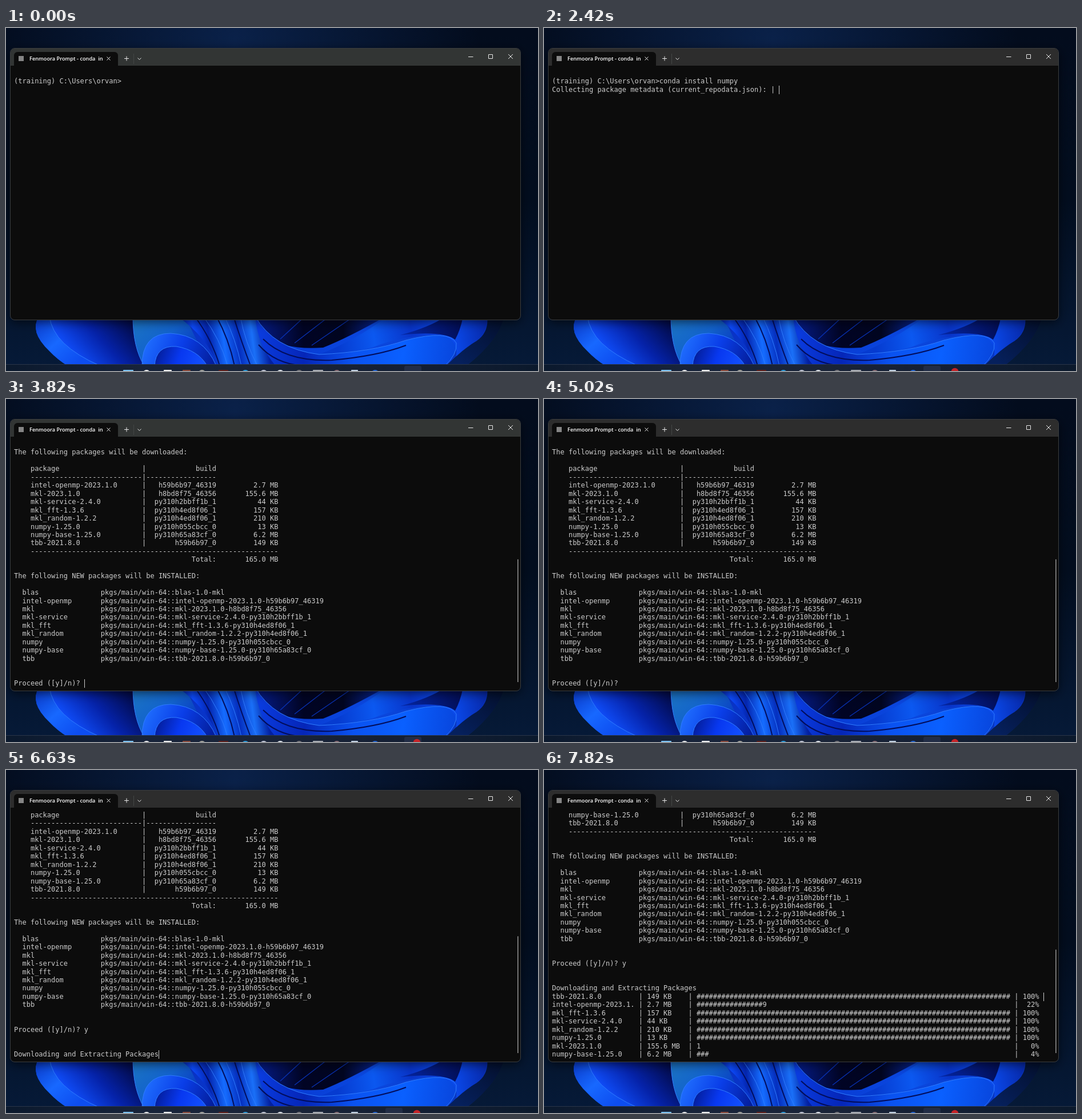
An HTML page with a canvas that plays this animation: 931x601 px, repeating every 8 s.

```html
<!DOCTYPE html>
<html lang="en">
<head>
<meta charset="utf-8">
<title>Terminal</title>
<style>
  html, body { margin: 0; width: 100%; height: 100%; overflow: hidden; background: #030d1e; }
  canvas { display: block; }
</style>
</head>
<body>
<canvas id="stage" width="931" height="601"></canvas>
<script>
const W = 931, H = 601, LOOP = 8000;
const CELL = 7.225, ROW = 14.45, LEFT = 14, TOP = 71.7, ROWS = 30;
const ctx = document.getElementById('stage').getContext('2d');

// name, version, build, size
const packages = [
  ['intel-openmp', '2023.1.0', 'h59b6b97_46319', '2.7 MB'],
  ['mkl', '2023.1.0', 'h8bd8f75_46356', '155.6 MB'],
  ['mkl-service', '2.4.0', 'py310h2bbff1b_1', '44 KB'],
  ['mkl_fft', '1.3.6', 'py310h4ed8f06_1', '157 KB'],
  ['mkl_random', '1.2.2', 'py310h4ed8f06_1', '210 KB'],
  ['numpy', '1.25.0', 'py310h055cbcc_0', '13 KB'],
  ['numpy-base', '1.25.0', 'py310h65a83cf_0', '6.2 MB'],
  ['tbb', '2021.8.0', 'h59b6b97_0', '149 KB']
];

// package index, progress at the first full report, gain per report (tenths of a bar cell)
const downloads = [
  [7, 81, 340], [0, 13, 39], [3, 231, 270], [2, 760, 760],
  [4, 115, 330], [5, 0, 380], [1, 0, 0.25], [6, 0, 7.5]
];

const tableRow = (a, b, c) => '    ' + a.padEnd(27) + '|' + b.padStart(17) + c.padStart(15);

const summary = [
  '',
  'The following packages will be downloaded:',
  '',
  tableRow('package', 'build', ''),
  '    ' + '-'.repeat(27) + '|' + '-'.repeat(17),
  ...packages.map(([n, v, b, s]) => tableRow(n + '-' + v, b, s)),
  '    ' + '-'.repeat(60),
  'Total:'.padStart(49) + '165.0 MB'.padStart(15),
  '',
  'The following NEW packages will be INSTALLED:',
  '',
  '  ' + 'blas'.padEnd(19) + 'pkgs/main/win-64::blas-1.0-mkl',
  ...packages.map(([n, v, b]) => '  ' + n.padEnd(19) + `pkgs/main/win-64::${n}-${v}-${b}`),
  '',
  ''
];

function downloadRow([index, start, gain], step) {
  const [name, version, , size] = packages[index];
  const done = Math.max(0, Math.min(760, Math.floor(start + gain * step)));
  const bar = '#'.repeat(Math.floor(done / 10)) + (done % 10 || '');
  const percent = Math.round(done / 7.6) + '%';
  return `${name}-${version}`.slice(0, 20).padEnd(21) + '| ' + size.padEnd(10) +
    '| ' + bar.padEnd(76) + ' | ' + percent.padStart(4) + ' ';
}

const stepsSince = (t, start) => Math.floor((t - start + 10) / 200);

function terminalLines(t) {
  if (t < 3820) {
    const command = 'conda install numpy';
    const typed = t < 410 ? 0 : t < 610 ? 9 : command.length;
    const lines = ['', '(training) C:\\Users\\orvan>' + command.slice(0, typed)];
    if (t >= 1830) {
      const spin = '-\\|/'[(stepsSince(t, 2420) + 2) % 4];
      const collecting = 'Collecting package metadata (current_repodata.json): ';
      if (t < 2420) lines.push('');
      else if (t < 3620) lines.push(collecting + spin + ' ');
      else lines.push(collecting + 'done', 'Solving environment: ' + spin + ' ');
    }
    return lines;
  }
  const lines = [...summary, 'Proceed ([y]/n)? ' + (t >= 5410 ? 'y' : '')];
  if (t >= 6630) lines.push('', '', 'Downloading and Extracting Packages');
  if (t >= 6830) {
    const step = stepsSince(t, 7030);
    lines.push(...downloads.map(d => downloadRow(d, step)));
  }
  return lines;
}

const within = (t, a, b) => t >= a && t < b;

function caretVisible(t) {
  return t >= 200 && !within(t, 1210, 1610) && !within(t, 4820, 5210) && !within(t, 6010, 6630);
}

function drawTerminal(t) {
  const lines = terminalLines(t);
  const first = Math.max(0, lines.length - ROWS);
  ctx.font = '12px "DejaVu Sans Mono", monospace';
  ctx.fillStyle = '#cccccc';
  lines.slice(first).forEach((line, r) => {
    for (let c = 0; c < line.length; c++) {
      if (line[c] !== ' ') ctx.fillText(line[c], LEFT + c * CELL, TOP + r * ROW + 11 + 14.45 * 0 + 0.3);
    }
  });
  if (caretVisible(t)) {
    const row = t >= 6830 ? lines.length - downloads.length : lines.length - 1;
    const x = Math.round(LEFT + lines[row].length * CELL - 0.4 + (row === 1 ? -1 : 0) * 0 + 0.3);
    ctx.fillRect(x, Math.round(TOP + (row - first) * ROW), 1, 15);
  }
  if (t >= 3820) {
    const thumb = 423 * ROWS / (lines.length + 29);
    ctx.fillStyle = '#8c8c8c';
    ctx.fillRect(895, 496 - thumb, 1.6, thumb);
  }
}

function box(g, x, y, w, h, r, color) {
  g.fillStyle = color;
  g.beginPath();
  g.roundRect(x, y, w, h, r);
  g.fill();
}

function disc(g, x, y, r, color) {
  g.fillStyle = color;
  g.beginPath();
  g.arc(x, y, r, 0, 7);
  g.fill();
}

function gradient(g, line, colors) {
  const fill = g.createLinearGradient(...line);
  colors.forEach((c, i) => fill.addColorStop(i / (colors.length - 1), c));
  return fill;
}

function petal(g, path, line, ...colors) {
  g.fillStyle = gradient(g, line, colors);
  g.fill(new Path2D(path));
}

function strokes(g, color, width, ...paths) {
  g.strokeStyle = color;
  g.lineWidth = width;
  paths.forEach(p => g.stroke(new Path2D(p)));
}

function drawBloom(g) {
  petal(g, 'M830 505H872Q862 548 806 592H740Z', [800, 590, 870, 510], '#06205c', '#030f2c');
  petal(g, 'M58 505Q40 532 76 566Q90 581 108 592H770Q800 562 828 545Q845 530 842 505Z',
    [51, 0, 842, 0], '#0d4df0', '#0a30c0', '#0838d0', '#0a48e0', '#0730b8');
  petal(g, 'M58 505Q40 532 76 566Q90 581 108 592H165Q82 556 76 505Z',
    [55, 515, 120, 590], '#0a3fd0', '#1768ff', '#0d4df0');
  petal(g, 'M76 505Q82 556 165 592H242Q222 560 222 505Z',
    [212, 508, 125, 588], '#020a48', '#0522a8', '#1050ff');
  petal(g, 'M222 505H312Q336 545 350 592H242Q222 560 222 505Z',
    [230, 512, 310, 592], '#1a72c4', '#1262cc', '#0633c0');
  petal(g, 'M238 592Q238 535 288 535Q345 538 368 592Z',
    [245, 540, 360, 592], '#2070ff', '#0a3ee8', '#041e9c');
  petal(g, 'M260 592Q262 556 298 558Q336 564 352 592Z',
    [262, 560, 345, 592], '#031a90', '#0838f0', '#1250ff');
  petal(g, 'M300 505H440Q442 560 480 592H372Q350 540 300 505Z',
    [305, 550, 455, 530], '#04189a', '#0d4cff', '#0426b0', '#156cff', '#0530c0', '#1a70f8', '#0320a0');
  petal(g, 'M432 505H665Q600 542 555 560Q490 565 455 540Z',
    [450, 0, 660, 0], '#04187c', '#010424', '#010520', '#0626a0');
  petal(g, 'M436 505Q468 562 548 572Q640 568 700 547Q775 528 788 552Q790 572 768 592H472Q440 555 436 505Z',
    [440, 540, 780, 580], '#0a3ce0', '#0526b8', '#0a52f0', '#0a60ff', '#0848e0');
  petal(g, 'M548 572Q610 548 668 505H842Q844 530 824 548Q806 558 788 575Q792 542 755 537Q690 540 640 560Q590 574 548 572Z',
    [580, 560, 840, 515], '#063bd0', '#0b58f0', '#0834c8', '#0b4cf0', '#0628a8');
  petal(g, 'M690 538Q740 525 770 505H800Q795 530 786 546Q765 530 690 538Z',
    [700, 538, 800, 508], '#0424a0', '#020c50');
  strokes(g, '#2f7cff', 1,
    'M76 505Q82 556 165 592', 'M222 505Q222 560 242 592', 'M238 592Q238 535 288 535Q345 538 368 592',
    'M260 592Q262 556 298 558Q336 564 352 592', 'M345 505Q375 545 388 592',
    'M382 505Q402 545 412 592', 'M410 505Q418 550 440 592',
    'M436 505Q468 562 548 572Q640 568 700 547Q775 528 788 552Q790 572 768 592');
  strokes(g, '#020d5c', 2,
    'M330 505Q360 545 374 592', 'M368 505Q390 545 400 592', 'M398 505Q412 550 428 592',
    'M450 545Q490 585 570 582Q650 575 700 556', 'M442 555Q470 588 520 592');
  strokes(g, '#0830b0', 1.5, 'M505 552L562 508', 'M535 556L605 508', 'M480 545L520 508');
}

function drawWallpaper(g) {
  g.fillStyle = gradient(g, [0, 0, 0, H], ['#030c1d', '#020d1e', '#061a38']);
  g.fillRect(0, 0, W, H);
  const glow = g.createRadialGradient(400, 20, 0, 400, 20, 430);
  glow.addColorStop(0, '#0a2149');
  glow.addColorStop(1, '#0a214900');
  g.fillStyle = glow;
  g.fillRect(0, 0, W, H);
  drawBloom(g);

  g.shadowColor = 'rgba(0,0,0,.6)';
  g.shadowBlur = 18;
  g.shadowOffsetY = 4;
  box(g, 8, 36, 892, 475, 7, '#0c0c0c');
  g.shadowColor = 'transparent';

  g.fillStyle = gradient(g, [0, 0, W, 0], ['#0b192d', '#17233a', '#1a2438', '#141f34', '#0b192c']);
  g.fillRect(0, 590, W, 11);
  g.fillStyle = '#2a3548';
  g.fillRect(0, 589, W, 1);
}

const wallpaper = document.createElement('canvas');
wallpaper.width = W;
wallpaper.height = H;
drawWallpaper(wallpaper.getContext('2d'));

const squareIcons = [[205, 18, '#7cc4f4'], [276, 14, '#f2f2f2'], [309, 14, '#8a4a3c'],
  [372, 17, '#5c1f1c'], [537, 18, '#a9adb4'], [604, 12, '#c3d3e4']];
const roundIcons = [[246, '#f4f4f4'], [343, '#a8a8a0'], [419, '#2ba0e0'], [451, '#c8ccdc'],
  [480, '#e8edf4'], [513, '#77777c'], [579, '#8c7078'], [646, '#2468d8']];

function drawTaskbar(t, focused) {
  box(ctx, focused ? 664 : 697, 592, 30, 14, 3, '#222d46');
  squareIcons.forEach(([x, w, c]) => box(ctx, x, 599, w, w, 1, c));
  roundIcons.forEach(([x, c]) => disc(ctx, x, 606, 7, c));
  if (t >= 200) disc(ctx, 719, 602, 6.3, '#c42328');
}

function drawChrome(focused) {
  box(ctx, 8, 36, 892, 30, [7, 7, 0, 0], focused ? '#2d2d2d' : '#323534');
  box(ctx, 14, 42, 182, 24, [6, 6, 0, 0], '#0c0c0c');
  box(ctx, 22, 49, 9, 9, 0, '#858585');
  ctx.fillStyle = '#ffffff';
  ctx.font = '600 9.2px "Open Sans", "Noto Sans", sans-serif';
  ctx.fillText('Fenmoora Prompt - conda  in', 41, 57.3);

  strokes(ctx, '#e8e8e8', 1,
    'M176.5 50.5l6 6m0 -6l-6 6', 'M207 53.5h8m-4 -4v8', 'M230.5 52.5l3 3l3 -3',
    'M809 50.5h8.5', 'M844.5 46.5h7v7h-7z', 'M879 46l8 8m0 -8l-8 8');
  strokes(ctx, '#444745', 1, 'M223.5 45v18');
  ctx.strokeStyle = '#3b3d3f';
  ctx.beginPath();
  ctx.roundRect(7.5, 35.5, 893, 476, 7.5);
  ctx.stroke();
}

function drawPointer(x, y, color) {
  const arrow = new Path2D(
    `M${x} ${y}v9.6l2.2 -2l1.6 3.6l1.7 -.7l-1.6 -3.5h3.1z`);
  ctx.strokeStyle = '#000000';
  ctx.lineWidth = 1;
  ctx.stroke(arrow);
  ctx.fillStyle = color;
  ctx.fill(arrow);
}

function draw(t) {
  const focused = within(t, 200, 3820) || t >= 4820;
  ctx.drawImage(wallpaper, 0, 0);
  drawTaskbar(t, focused);
  drawChrome(focused);
  drawTerminal(t);
  if (within(t, 200, 810)) disc(ctx, 362, 217.5, 9, '#820609');
  if (within(t, 200, 1830)) drawPointer(362.5, 218, '#c9c4c4');
  if (within(t, 6210, 6630)) drawPointer(820.3, 575.3, '#ffffff');
}

const began = performance.now();
function tick() {
  draw((performance.now() - began) % LOOP);
  requestAnimationFrame(tick);
}
tick();
</script>
</body>
</html>
```
